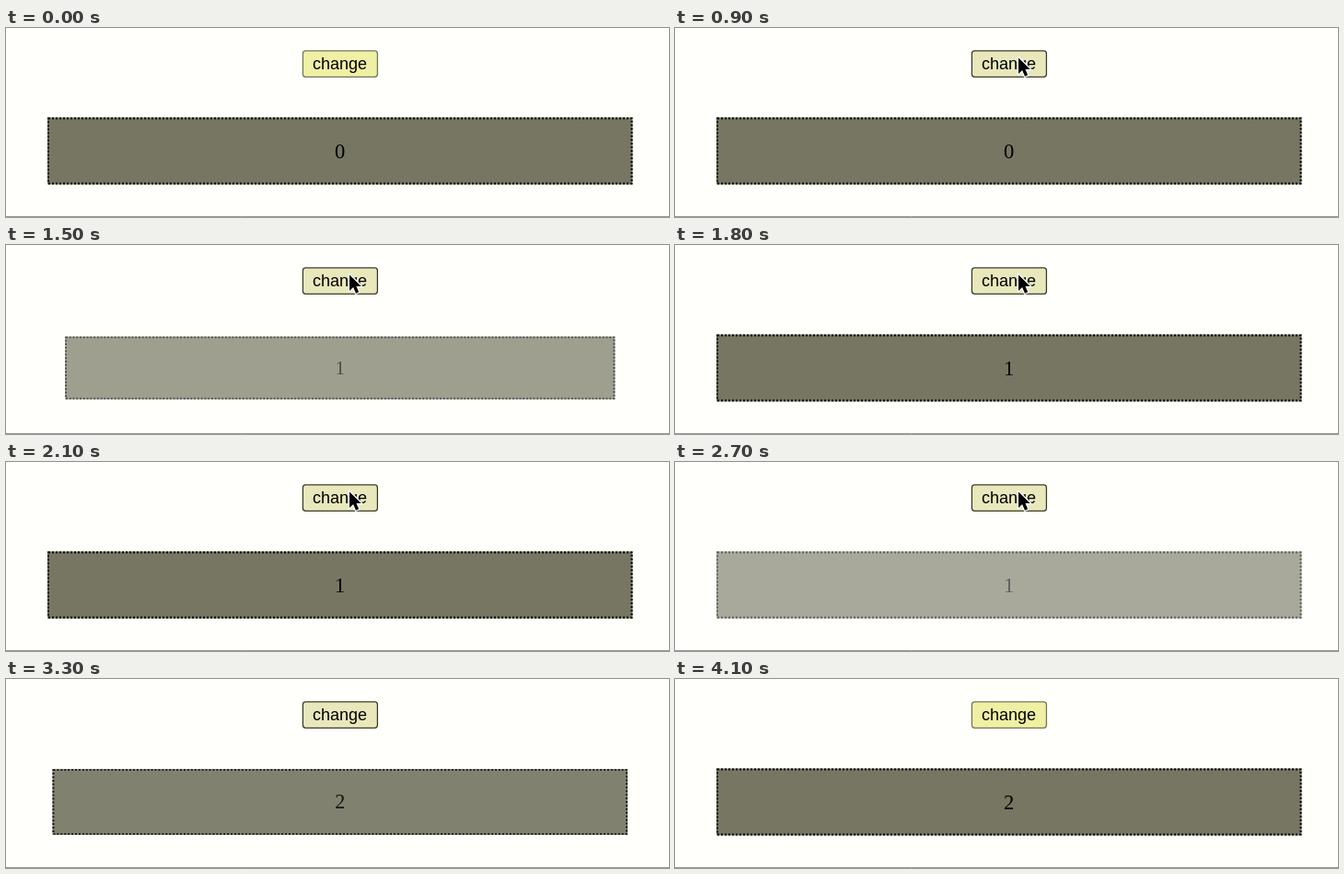
An HTML page that plays this animation: 720x206 px, repeating every 4200 ms.

```html
<!DOCTYPE html>
<html lang="en">
<head>
<meta charset="utf-8">
<title>Switch transition</title>
<style>
  html, body { margin: 0; width: 100%; height: 100%; overflow: hidden; background: #fffffc; }
  svg { display: block; width: 720px; height: 206px; }
  #label { font: 18px "Liberation Sans", Arial, sans-serif; }
  #count { font: 22.5px "Liberation Serif", Times, serif; }
</style>
</head>
<body>
<svg viewBox="0 0 720 206">
  <path d="M0 205.5H720" stroke="#999"/>
  <rect id="button" x="322.4" y="24.9" width="81" height="28.4" rx="3" stroke-width="1.3"/>
  <text id="label" x="362.5" y="45.3" text-anchor="middle">change</text>
  <g id="panel">
    <rect x="45" y="97.5" width="635.5" height="73" fill="#767662"/>
    <rect x="46" y="98.5" width="633.5" height="71" fill="none" stroke="#000" stroke-width="2" stroke-dasharray="2 2"/>
    <text id="count" x="362.7" y="141.5" text-anchor="middle">0</text>
  </g>
  <path id="cursor" d="M0 0V16.4L3.9 12.8L6.6 19L9.6 17.7L7 11.7H12Z"
    fill="#000" stroke="#fff" stroke-width="2.4" stroke-linejoin="round" paint-order="stroke"/>
</svg>
<script>
  const LOOP = 4200, STEP = 100, FADE = 425;
  const CLICKS = [900, 2600];
  const HOVER = [700, 3500];
  const CURSOR = { from: [418, -26], to: [373, 32.5], start: 400, stop: 800, hide: 3000 };
  const $ = id => document.getElementById(id);
  const [button, panel, count, cursor] = ['button', 'panel', 'count', 'cursor'].map($);
  const clamp = v => Math.min(1, Math.max(0, v));
  const within = (t, [a, b]) => t >= a && t < b;
  const bez = (a, b, u) => 3 * a * u * (1 - u) ** 2 + 3 * b * u * u * (1 - u) + u ** 3;

  // CSS "ease": cubic-bezier(.25, .1, .25, 1)
  function ease(x) {
    if (x <= 0 || x >= 1) return clamp(x);
    let lo = 0, hi = 1;
    for (let i = 0; i < 24; i++) {
      const mid = (lo + hi) / 2;
      if (bez(.25, .25, mid) < x) lo = mid; else hi = mid;
    }
    return bez(.1, 1, lo);
  }

  // The old value fades out, then the new one fades and grows in.
  function drawPanel(t) {
    let value = 0, opacity = 1, scale = 1;
    for (const click of CLICKS) {
      const p = (t - click) / FADE;
      if (p < 0) break;
      if (p < 1) {
        opacity = 1 - ease(p);
      } else {
        value++;
        opacity = ease(p - 1);
        scale = .8 + .2 * opacity;
      }
    }
    count.textContent = value;
    panel.setAttribute('opacity', opacity);
    panel.setAttribute('transform', `translate(362.75 134) scale(${scale}) translate(-362.75 -134)`);
  }

  function drawButton(t) {
    const hover = within(t, HOVER);
    const active = CLICKS.some(c => within(t, [c - STEP, c]));
    button.setAttribute('fill', active ? '#f5f5c8' : hover ? '#e8e8bc' : '#f0f0a4');
    button.setAttribute('stroke', active ? '#808070' : hover ? '#3c3c28' : '#74745c');
  }

  function drawCursor(t) {
    const { from, to, start, stop, hide } = CURSOR;
    const p = ease((t - start) / (stop - start));
    const [x, y] = from.map((v, i) => v + (to[i] - v) * p);
    cursor.setAttribute('transform', `translate(${x} ${y}) scale(1.06)`);
    cursor.setAttribute('visibility', within(t, [start, hide]) ? 'visible' : 'hidden');
  }

  function draw() {
    const t = Math.floor(performance.now() % LOOP / STEP) * STEP;
    drawPanel(t);
    drawButton(t);
    drawCursor(t);
    requestAnimationFrame(draw);
  }
  draw();
</script>
</body>
</html>
```
